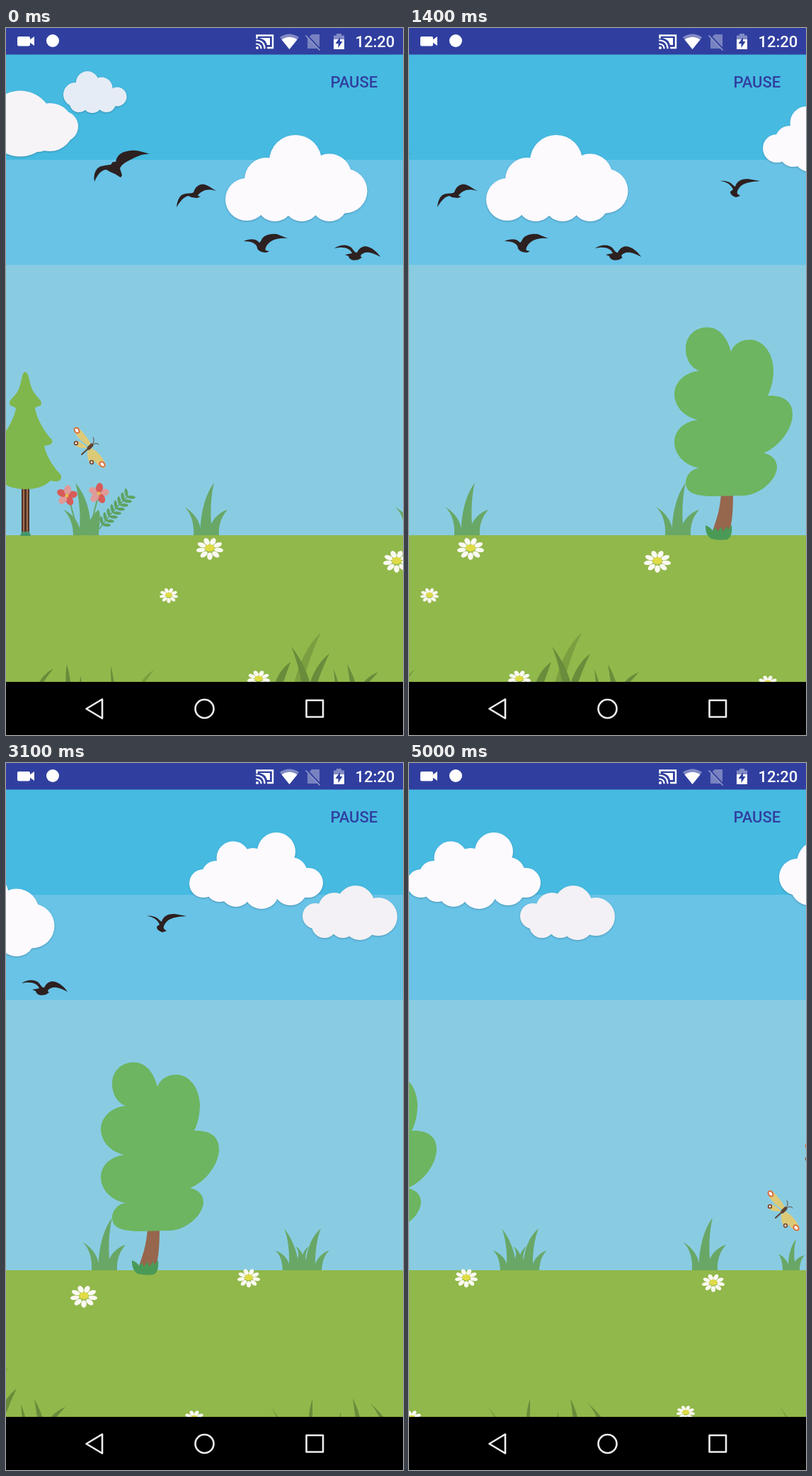
An HTML page that plays this animation: 561x998 px, repeating every 5.1 s.

```html
<!DOCTYPE html>
<html lang="en">
<head>
<meta charset="utf-8">
<title>Scrolling meadow</title>
<style>
  html, body { margin: 0; width: 100%; height: 100%; overflow: hidden; background: #000; }
  svg { display: block; }
  text { font: 500 22px Roboto, sans-serif; }
  .cloud { filter: drop-shadow(0 1.5px 1px rgba(30, 80, 110, .4)); }
  .line { fill: none; stroke-linecap: round; }
</style>
</head>
<body>
<svg width="561" height="998" viewBox="0 0 561 998">
  <defs>
    <path id="tuft" fill="#69a767" d="M13 716C14 700 10 685 0 676C12 683 20 693 23 706C23 690 28 660 42 642C37 662 37 685 38 700C43 690 51 683 61 680C52 690 48 703 49 716Z"/>
    <g id="daisy">
      <g id="petals" fill="#fbf9f2"></g>
      <ellipse rx=".36" ry=".32" cy="-.06" fill="#e0db46"/>
    </g>
    <g id="butterfly">
      <g fill="#dcca78">
        <path d="M0-1C-7-5-20-15-22-25Q-22-30-16-28C-8-21-1-11 3-3Z"/>
        <path d="M2 1C12 5 20 16 23 25Q23 30 17 28C8 23 2 13 0 3Z"/>
        <path d="M-2 1Q-20 2-22-6Q-19-11-12-7ZM-2 2Q5 10 7 20Q4 25 0 21Q-5 12-2 2Z"/>
      </g>
      <g fill="#fff" stroke="#d9693c" stroke-width="2">
        <ellipse cx="-18" cy="-24" rx="3" ry="4" transform="rotate(-35 -18 -24)"/>
        <ellipse cx="18" cy="24" rx="3" ry="4" transform="rotate(-45 18 24)"/>
      </g>
      <g fill="#fff" stroke="#7d4a2c" stroke-width="1.8">
        <circle cx="-19" cy="-6" r="2.3"/><circle cx="3" cy="21" r="2.3"/>
      </g>
      <g class="line" stroke="#5e4333">
        <path stroke-width="2" d="M-11 10L0 0"/>
        <path stroke-width="5" d="M-1 1L3-3"/>
        <path d="M4-4Q8-10 5-14M4-3Q9-8 13-4"/>
      </g>
    </g>
  </defs>

  <rect width="561" height="187" fill="#46bae1"/>
  <rect y="186" width="561" height="149" fill="#68c3e7"/>
  <rect y="334.5" width="561" height="382" fill="#89cce2"/>
  <rect y="716" width="561" height="207" fill="#91b84b"/>

  <g id="world">
    <g id="clouds"></g>
    <g fill="#2d2020">
      <path d="M125 217C123 206 127 197 135 195C140 194 144 193 148 193L151 189L155 189C157 178 165 174 177 173C186 172 196 176 203 178C190 177 180 184 172 188C166 191 163 194 161 198L164 208L162 211L154 206L147 203L142 200C135 200 129 207 125 217Z"/>
      <path d="M241 253C242 242 246 235 253 234C258 233 262 234 265 232C268 222 276 219 281 221C288 223 292 228 298 230C288 227 281 228 277 231C274 233 272 234 271 237L275 238L270 240L262 239L258 237C251 238 246 245 241 253Z"/>
      <path d="M336 301C342 298 351 297 356 301C358 304 359 303 361 299C364 292 374 290 383 291L398 297C386 296 377 298 371 304C367 308 366 312 367 314L372 315L368 317C361 317 356 314 355 311C355 306 350 301 336 301Z"/>
      <path d="M464 311C472 305 484 305 489 311C492 315 493 317 496 317C500 309 506 307 512 309C520 312 525 317 529 323C520 318 511 315 505 318C501 320 500 322 503 324L498 327C491 329 485 327 484 322L479 320L489 318C486 311 478 308 464 311Z"/>
      <path transform="translate(201)" d="M440 216C447 215 454 217 458 222L461 224C463 216 470 213 479 213L496 216C485 217 475 218 469 223C465 227 463 231 464 234L468 237L462 239C457 237 454 235 454 231L458 228C455 221 449 217 440 216Z"/>
    </g>

    <!-- pine -->
    <path fill="#4b2d22" d="M22 645H33V717H22Z"/>
    <path class="line" stroke="#a5714f" stroke-width="2.5" stroke-dasharray="1 2" d="M25 651V713M30 652V713"/>
    <path fill="#46956a" d="M20 717L22 711L33 711L35 717Z"/>
    <path fill="#80b74c" d="M27 485.500C33 486 33 503 38 512C42 520 50 524 50 530C50 535 43 533 41 537C45 556 57 573 64 580C68 586 63 589 54 590C58 607 68 621 77 630C81 639 73 642 63 639C54 648 41 651 27 651C13 651 1 648-8 639C-18 642-26 639-22 630C-13 621-4 607 0 592C-8 589-13 586-9 580C-2 573 10 556 14 537C11 533 4 535 5 529C5 524 13 520 17 512C22 503 22 486 27 485.500Z"/>

    <!-- flower bush -->
    <g class="line" stroke="#69a767" stroke-width="2">
      <path d="M90 668Q97 692 102 716M129 666Q122 690 119 716"/>
    </g>
    <path fill="#69a767" d="M95 716C95 702 90 688 81 680C92 684 101 695 104 706C106 690 103 660 98 642C112 658 118 680 119 695C121 690 126 683 131 680C135 690 131 705 131 716Z"/>
    <g id="fern" fill="#5fa263"><path class="line" stroke="#5fa263" stroke-width="1.500" d="M132 707Q148 684 171 662"/></g>
    <g id="blossoms"></g>
    <use href="#butterfly" x="118" y="592"/>
    <use href="#butterfly" x="1233" y="632"/>
    <use href="#butterfly" x="1286" y="565"/>

    <use href="#tuft" x="252"/>
    <use href="#tuft" x="550"/>
    <use href="#tuft" x="1091"/>
    <path fill="#69a767" transform="translate(358)" d="M475 716C474 702 471 693 464 688C473 691 481 697 484 707C485 690 482 668 477 657C488 670 495 690 496 700C499 692 496 686 493 682C498 685 501 689 503 694C505 689 508 685 512 682C509 688 506 694 508 702C510 685 516 668 529 657C523 672 521 690 521 707C525 697 532 691 541 688C534 694 531 704 530 716Z"/>
    <path fill="#69a767" transform="translate(704)" d="M528 716C528 708 526 698 522 693C529 696 534 702 536 708C536 695 540 681 547 672C544 684 544 695 545 704C549 699 553 696 559 695C554 700 552 708 552 716Z"/>

    <!-- leafy tree -->
    <g transform="translate(201)">
      <path fill="#96664d" d="M441 655H458C458 680 457 698 452 713H428C434 695 440 680 441 655Z"/>
      <path fill="#4a9a56" d="M419 702C424 704 427 706 429 710L433 705L436 711L441 704L444 711L449 703L451 709C452 706 454 703 456 702C457 712 455 719 450 722Q437 724 427 721C420 716 419 710 419 702Z"/>
      <path fill="#6db560" d="M455 457C449 434 436 422 421 422.500C401 423 391 438 391 452C391 470 400 480 410 484C390 486 375 500 375 517C375 535 391 550 408 553C388 556 375 568 375 585C375 602 390 618 410 621C397 623 391 633 391 642C391 655 403 661 430 661L475 660C495 658 519 640 520 620C520 609 512 602 501 600C522 592 542 567 542 545C542 527 529 518 507 519C513 507 515 494 515 482C514 458 500 440 482 440C469 440 459 446 455 457Z"/>
    </g>
    <g id="ground"></g>
  </g>

  <!-- status bar -->
  <rect width="561" height="37.500" fill="#303f9f"/>
  <g fill="#fff">
    <rect x="16" y="12" width="18" height="13.500" rx="2"/>
    <path d="M33 17L40 12V25L33 20Z"/>
    <circle cx="66" cy="18" r="9"/>
    <path class="line" stroke="#fff" stroke-width="2.400" d="M354.500 14V10.500H377V28H370"/>
    <path d="M358 14H373V24H369Q367 16 358 14Z"/>
    <path class="line" stroke="#fff" stroke-width="2.200" d="M354 17.500Q365 18 365.500 28.500M354 22.500Q360 23 360.500 28.500"/>
    <circle cx="355" cy="28" r="2"/>
    <path opacity=".4" d="M400.500 30L387 13Q400.500 4 414 13Z"/>
    <path d="M400.500 30L389.500 16.500Q400.500 9 411.500 16.500Z"/>
    <path opacity=".35" d="M432 9H443V29H426V15Z"/>
    <path class="line" stroke="#303f9f" stroke-width="2.500" d="M425 10L444 30"/>
    <path class="line" stroke="#8c95c8" stroke-width="1.800" d="M424 11L443 31"/>
    <path opacity=".4" d="M467 8H474V10.500H478V18H463V10.500H467Z"/>
    <path d="M463 16H478V30H463Z"/>
    <path fill="#303f9f" d="M472 13L465.500 22H469.500V28L475.500 19H472Z"/>
    <text x="493.500" y="27">12:20</text>
  </g>
  <text x="458.500" y="83.500" fill="#303f9f">PAUSE</text>

  <!-- navigation bar -->
  <rect y="923" width="561" height="75"/>
  <g class="line" stroke="#eee" stroke-width="2.600" stroke-linejoin="round">
    <path d="M113.500 961L136 947.500V974.500Z"/>
    <circle cx="280.500" cy="961" r="13"/>
    <rect x="424.500" y="949" width="23.500" height="23.500"/>
  </g>
</svg>
<script>
const byId = id => document.getElementById(id);
const add = (id, markup) => byId(id).insertAdjacentHTML('beforeend', markup);

// Each cloud: left edge shift, colour, then circles as "x y r".
function cloud(shift, color, circles) {
  const discs = circles.split(',').map(c => {
    const [x, y, r] = c.trim().split(' ');
    return `<circle cx="${x}" cy="${y}" r="${r}"/>`;
  }).join('');
  add('clouds', `<g class="cloud" fill="${color}" transform="translate(${shift})">${discs}</g>`);
}
cloud(0, '#f6f4f7', '20 135 46.5, 62 140 34, 80 139 22, 45 150 25');
cloud(0, '#e6ecf5', '98 94 17, 115 77 16, 135 85 15.5, 157 97 13.5, 103 106 13, 122 106 14, 142 106 13, 122 95 18');
cloud(0, '#fdfafe', '340 242 30, 368 214 31, 409 188 37, 457 209 31.5, 479 230 31.5, 380 247 26, 418 247 26, 457 247 26, 410 222 35');
cloud(442, '#fdfafe', '279 170 20, 297 159 21, 321 134 23.5, 349 141 21, 382 125 27, 403 156 23, 427 169 21, 302 176 20, 325 181 22, 361 181 25, 402 177 24, 345 160 28, 375 158 25');
cloud(442, '#f3f1f5', '437 216 18, 464 206 23, 494 200 27, 526 217 27, 450 229 18, 476 229 18, 500 227 23, 485 215 22');
cloud(704, '#fdfafe', '549 161 26, 580 141 32, 566 174 27');

for (let a = 0; a < 360; a += 40)
  add('petals', `<ellipse cx=".68" rx=".34" ry=".2" transform="rotate(${a + 10})"/>`);

function blossom(x, y, colors) {
  const petals = colors.map((c, i) =>
    `<ellipse cx="8" rx="7" ry="5" fill="${c}" transform="rotate(${i * 72 - 10})"/>`).join('');
  add('blossoms', `<g transform="translate(${x} ${y})">${petals}<circle r="2.5" fill="#e5ba4f"/></g>`);
}
const red = '#d85b58', pink = '#df9a99';
blossom(86, 660, [red, red, pink, red, pink]);
blossom(131, 657, [pink, red, pink, pink, red]);

for (let i = 0; i < 8; i++) {
  const x = 136 + i * 5, y = 701 - i * 5.6;
  for (const angle of [-100, 5])
    add('fern', `<ellipse cx="6" rx="6" ry="2.3" transform="translate(${x} ${y}) rotate(${angle})"/>`);
}

// A curved blade from its base on the lower edge to its tip.
function blade(base, tip, top, width, color = '#688c3b') {
  const bend = (base * 2 + tip) / 3, mid = top + (930 - top) * .35;
  add('ground', `<path fill="${color}" d="M${base - width / 2} 930Q${bend - width / 2} ${mid} ${tip} ${top}Q${bend + width / 2} ${mid + 6} ${base + width / 2} 930Z"/>`);
}
const pale = '#7b9f40';
blade(46, 67, 904, 5);
blade(88, 86, 898, 7);
blade(105, 106, 915, 3);
blade(151, 148, 900, 4);
blade(190, 209, 906, 4, pale);
blade(412, 445, 853, 12, pale);
blade(384, 402, 895, 11);
blade(425, 403, 873, 12);
blade(433, 457, 883, 10);
blade(468, 463, 905, 5);
blade(491, 482, 898, 8);
blade(504, 526, 909, 6);
for (const shift of [0, 412]) blade(829 + shift, 812 + shift, 905, 5, pale);
blade(872, 875, 898, 5);
blade(914, 915, 916, 2);
blade(940, 932, 897, 7);
blade(976, 956, 903, 8);

for (const [x, y, rx, ry] of [
  [288, 735, 19, 15.5], [552, 753, 19, 15.5], [230, 801, 13, 10.5], [357, 919, 16, 12],
  [785, 727, 16, 13], [1134, 734, 16, 12.5], [708, 925, 14, 11], [1095, 917, 13, 10]
]) add('ground', `<use href="#daisy" transform="translate(${x} ${y}) scale(${rx} ${ry})"/>`);

// Scroll distance at set times, in ms and px; the picture steps every 100 ms.
const LOOP = 5100, STEP = 100;
const keys = [[0, 0], [600, 91], [1400, 201], [2500, 358], [3100, 442], [4200, 599], [5000, 704]];
function scrollAt(t) {
  const i = Math.max(1, keys.findIndex(k => k[0] >= t));
  const [t0, x0] = keys[i - 1], [t1, x1] = keys[i];
  return x0 + (x1 - x0) * (t - t0) / (t1 - t0);
}
const world = byId('world'), start = performance.now();
function frame() {
  const t = Math.max(0, performance.now() - start) % LOOP;
  world.setAttribute('transform', `translate(${-scrollAt(Math.floor(t / STEP) * STEP)})`);
  requestAnimationFrame(frame);
}
frame();
</script>
</body>
</html>
```
